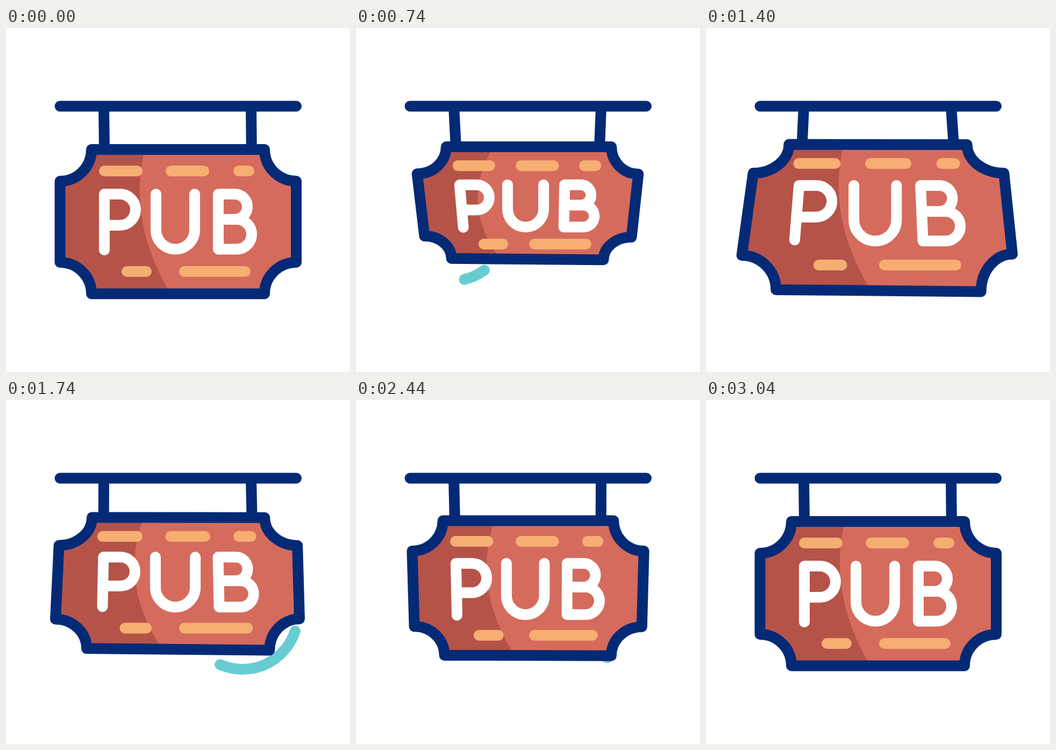
Recreate the animation shown at these times as an HTML page. Size 640x640 px, loop 3200 ms.

```html
<!DOCTYPE html>
<html lang="en">
<head>
<meta charset="utf-8">
<title>Swinging pub sign</title>
<style>
  html, body { margin: 0; width: 100%; height: 100%; overflow: hidden; background: #fff; }
  svg { display: block; width: 100%; height: 100%; }
  path { fill: none; stroke-width: 20; stroke-linecap: round; stroke-linejoin: round; }
  .navy { stroke: #042a76; }
  .flat { stroke-linecap: butt; }
  .teal { stroke: #67ccd2; }
  .tan { stroke: #f6ae72; }
  .white { stroke: #fff; }
</style>
</head>
<body>
<svg viewBox="0 0 640 640">
  <clipPath id="board"><path id="clip"/></clipPath>
  <path id="swoosh" class="teal"/>
  <path id="posts" class="navy flat"/>
  <path class="navy" d="M100.5 145.5H540"/>
  <path id="face" style="fill:#d56b5d"/>
  <g clip-path="url(#board)"><path id="shade" style="fill:#b55349"/></g>
  <path id="frame" class="navy"/>
  <path id="dashes" class="tan"/>
  <path id="letters" class="white"/>
</svg>
<script>
const LOOP = 3200;

// outline: clockwise from the top left; shade: top, bend and bottom x;
// dashes: upper y, lower y, then x pairs; posts: lower x
const rest = {
  outline: [159, 226, 481, 226, 540, 285, 540, 436, 481, 494.5, 159, 494.5, 100.5, 436, 100.5, 285],
  shade: [258, 226, 306],
  posts: [183, 456.8],
  dashes: [266, 453, 183, 244, 307, 368, 433, 452, 225, 261, 332, 445],
  caps: [309, 411.5],
  p: [183, 183, 413, 241, 367],
  u: [279, 351],
  b: [395, 395, 449, 457, 356]
};
const back = {
  outline: [168, 221, 475, 221, 525, 271.5, 512, 388, 460, 430, 178, 427.5, 128, 386, 114, 271],
  shade: [256, 190, 268],
  posts: [186, 453],
  dashes: [256, 401, 190, 249, 307, 367.5, 425, 446, 238, 273.5, 332, 427.5],
  caps: [291.5, 369.5],
  p: [193, 200, 370, 248, 338],
  u: [282, 349],
  b: [388, 386.5, 437, 443, 329]
};
const front = {
  outline: [154, 216.5, 486, 217, 555, 270, 571.5, 421.5, 513, 492, 129, 488.5, 65, 424, 87, 270],
  shade: [256, 224, 308],
  posts: [178.5, 461],
  dashes: [252, 442, 172, 240, 306, 372, 439, 463, 209, 252, 332, 466],
  caps: [293, 397],
  p: [172.5, 164, 395, 234, 352],
  u: [275, 354.5],
  b: [399.5, 404, 459, 474, 341.5]
};

const swing = [[200, rest], [790, back], [1465, front], [2075, back], [2645, rest]];

const swooshes = [
  { start: 190, cx: 178, cy: 367.5, from: 193, to: 53.7 },
  { start: 1470, cx: 440, cy: 398, from: 126, to: -13 },
  { start: 2360, cx: 504, cy: 383, from: 126, to: -13 }
];

const set = (id, d) => document.getElementById(id).setAttribute('d', d);
const mix = (a, b, k) => a + (b - a) * k;
const ease = (t, start, end) => {
  const x = Math.min(1, Math.max(0, (t - start) / (end - start)));
  return x * x * (3 - 2 * x);
};

function poseAt(t) {
  let i = 0;
  while (i < swing.length - 2 && t > swing[i + 1][0]) i++;
  const [start, from] = swing[i], [end, to] = swing[i + 1];
  const k = ease(t, start, end), pose = {};
  for (const key in from) pose[key] = from[key].map((v, n) => mix(v, to[key][n], k));
  return pose;
}

// Concave corner: vertical at the edge point, horizontal at the side point.
function corner(x0, y0, x1, y1, fromEdge) {
  const k = 0.552;
  const c = fromEdge
    ? [x0, mix(y0, y1, k), mix(x1, x0, k), y1]
    : [mix(x0, x1, k), y0, x1, mix(y1, y0, k)];
  return `C${c} ${x1} ${y1}`;
}

function outlinePath(o) {
  let d = `M${o[0]} ${o[1]}`;
  for (let i = 0; i < 4; i++) {
    const a = i * 4 + 2, b = (a + 2) % 16;
    d += `L${o[a]} ${o[a + 1]}`;
    if (i % 2 === 0) d += corner(o[a], o[a + 1], o[b], o[b + 1], true);
    else d += corner(o[a], o[a + 1], o[b], o[b + 1], false);
  }
  return d + 'Z';
}

// Bar that ends in a half circle on the right, from y0 down to y1.
function bowl(right, y0, y1) {
  const r = (y1 - y0) / 2, x = right - r;
  return `L${x} ${y0}A${r} ${r} 0 0 1 ${x} ${y1}`;
}

function lettersPath({ caps: [top, base], p, u, b }) {
  const joinP = mix(p[0], p[1], (p[4] - top) / (p[2] - top));
  const joinB = mix(b[0], b[1], (b[4] - top) / (base - top));
  const r = (u[1] - u[0]) / 2;
  return `M${p[1]} ${p[2]}L${p[0]} ${top}${bowl(p[3], top, p[4])}L${joinP} ${p[4]}` +
    `M${u[0]} ${top}V${base - r}A${r} ${r} 0 0 0 ${u[1]} ${base - r}V${top}` +
    `M${b[0]} ${top}${bowl(b[2], top, b[4])}L${joinB} ${b[4]}` +
    `${bowl(b[3], b[4], base)}L${b[1]} ${base}L${b[0]} ${top}Z`;
}

function dashesPath([upper, lower, ...x]) {
  let d = '';
  for (let i = 0; i < x.length; i += 2) d += `M${x[i]} ${i < 6 ? upper : lower}H${x[i + 1]}`;
  return d;
}

function swooshPath(t) {
  const s = swooshes.find(({ start }) => t > start && t < start + 680);
  if (!s) return '';
  const r = 103;
  const point = deg => {
    const a = deg * Math.PI / 180;
    return `${s.cx + r * Math.cos(a)} ${s.cy + r * Math.sin(a)}`;
  };
  const head = mix(s.from, s.to, ease(t, s.start, s.start + 390));
  const tail = mix(s.from, s.to, ease(t, s.start + 180, s.start + 680));
  return `M${point(tail + 0.05)}A${r} ${r} 0 0 0 ${point(head)}`;
}

function draw(t) {
  const pose = poseAt(t), o = pose.outline, [sTop, sBend, sBase] = pose.shade;
  const outline = outlinePath(o);
  const top = o[1], base = (o[9] + o[11]) / 2;
  for (const id of ['clip', 'face', 'frame']) set(id, outline);
  set('shade', `M0 ${top}H${sTop}Q${sBend} ${(top + base) / 2} ${sBase} ${base}H0Z`);
  set('posts', `M182 146L${pose.posts[0]} ${top}M456 146L${pose.posts[1]} ${top}`);
  set('dashes', dashesPath(pose.dashes));
  set('letters', lettersPath(pose));
  set('swoosh', swooshPath(t));
}

const begin = performance.now();
function tick() {
  draw((performance.now() - begin) % LOOP);
  requestAnimationFrame(tick);
}
tick();
</script>
</body>
</html>
```
